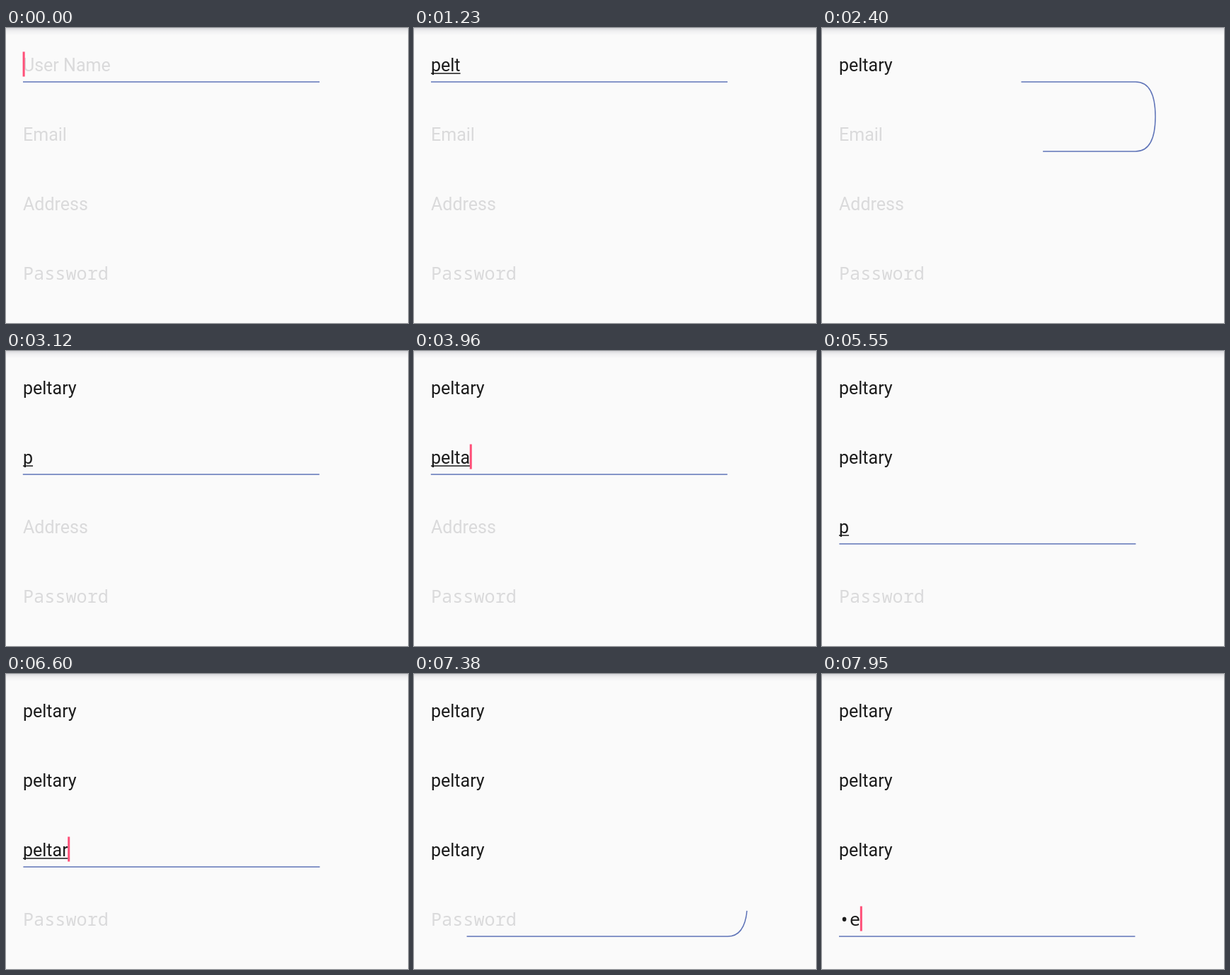
An HTML page for the animation above (8000 ms loop, 568 by 416 pixels).

```html
<!DOCTYPE html>
<html lang="en">
<head>
<meta charset="utf-8">
<title>Form with a travelling underline</title>
<style>
  html, body { margin: 0; width: 100%; height: 100%; overflow: hidden; background: #fafafa; }
  svg { display: block; width: 568px; height: 416px; }
  text { font: 25px Roboto, Arial, sans-serif; fill: #1c1c1c; white-space: pre; }
  text.mono { font: 25.2px "Noto Sans Mono", "DejaVu Sans Mono", monospace; }
  text.hint { fill: #dadadb; }
  #line { fill: none; stroke: #5f74b8; stroke-width: 1.5; }
  #caret { fill: #ff4f78; }
  #under { fill: #1c1c1c; }
</style>
</head>
<body>
<svg viewBox="0 0 568 416">
  <defs>
    <linearGradient id="shade" x1="0" y1="0" x2="0" y2="1">
      <stop offset="0" stop-color="#d6d6da"/>
      <stop offset=".4" stop-color="#eeeef0"/>
      <stop offset="1" stop-color="#fafafa"/>
    </linearGradient>
  </defs>
  <rect width="568" height="10" fill="url(#shade)"/>
  <g id="fields"></g>
  <path id="line"/>
  <rect id="under" x="24" height="1.5"/>
  <rect id="caret" width="3" height="35"/>
</svg>
<script>
const LOOP = 8000, LEFT = 24, RIGHT = 443, WIDTH = RIGHT - LEFT, ROW = 98, MOVE = 500;
const WORD = 'peltary';
const HINTS = ['User Name', 'Email', 'Address', 'Password'];

// Time of each keystroke, by field
const KEYS = [
  [450, 660, 870, 1110, 1350, 1560, 1770],
  [2940, 3180, 3420, 3630, 3870, 4080, 4320],
  [5460, 5700, 5940, 6120, 6300, 6510, 6720],
  [7710, 7890]
];
const MOVES = [2160, 4610, 6980];
const CARET_ON = [
  [0, 120], [620, 1120], [1440, 1920], [2670, 3000], [3500, 4000], [4500, 4610],
  [5110, 5440], [5940, 6720], [7490, LOOP]
];

const $ = id => document.getElementById(id);
const line = $('line'), caret = $('caret'), under = $('under');

const texts = HINTS.map((hint, i) => {
  const el = document.createElementNS('http://www.w3.org/2000/svg', 'text');
  el.setAttribute('x', LEFT);
  el.setAttribute('y', 61 + i * ROW);
  if (i === 3) el.classList.add('mono');
  $('fields').append(el);
  return el;
});

// One winding path through all rows; starts[i] is where row i begins on it
const starts = [];
let d = `M${LEFT} 76`;
for (let i = 0; i < 4; i++) {
  const y = 76 + i * ROW, even = i % 2 === 0;
  const end = even ? RIGHT : LEFT, far = even ? RIGHT + 28 : LEFT - 19;
  line.setAttribute('d', d);
  starts.push(i ? line.getTotalLength() : 0);
  d += `H${end}`;
  if (i < 3) d += `Q${far} ${y} ${far} ${y + ROW / 2}Q${far} ${y + ROW} ${end} ${y + ROW}`;
}
line.setAttribute('d', d);
line.setAttribute('stroke-dasharray', `${WIDTH} 9999`);

const ease = p => (1 - Math.cos(Math.PI * Math.min(1, Math.max(0, p)))) / 2;

function setText(i, count) {
  let value = WORD.slice(0, count);
  if (i === 3 && count) value = '•'.repeat(count - 1) + value.slice(-1);
  const shown = value || HINTS[i];
  if (texts[i].textContent !== shown) texts[i].textContent = shown;
  texts[i].classList.toggle('hint', !value);
}

function draw(t) {
  const counts = KEYS.map(times => times.filter(k => t >= k).length);
  counts.forEach((n, i) => setText(i, n));

  const active = MOVES.filter(m => t >= m).length;
  const offset = MOVES.reduce((sum, m, i) =>
    sum + (starts[i + 1] - starts[i]) * ease((t - m) / MOVE), 0);
  line.setAttribute('stroke-dashoffset', -offset);

  const width = counts[active] ? texts[active].getComputedTextLength() : 0;
  under.setAttribute('y', 63.3 + active * ROW);
  under.setAttribute('width', active < 3 ? width : 0);

  const on = CARET_ON.some(([a, b]) => t >= a && t < b);
  caret.setAttribute('visibility', on ? 'visible' : 'hidden');
  caret.setAttribute('x', LEFT + width - .4);
  caret.setAttribute('y', 33.5 + active * ROW);
}

const begin = performance.now();
function tick() {
  draw((performance.now() - begin) % LOOP);
  requestAnimationFrame(tick);
}
tick();
</script>
</body>
</html>
```
